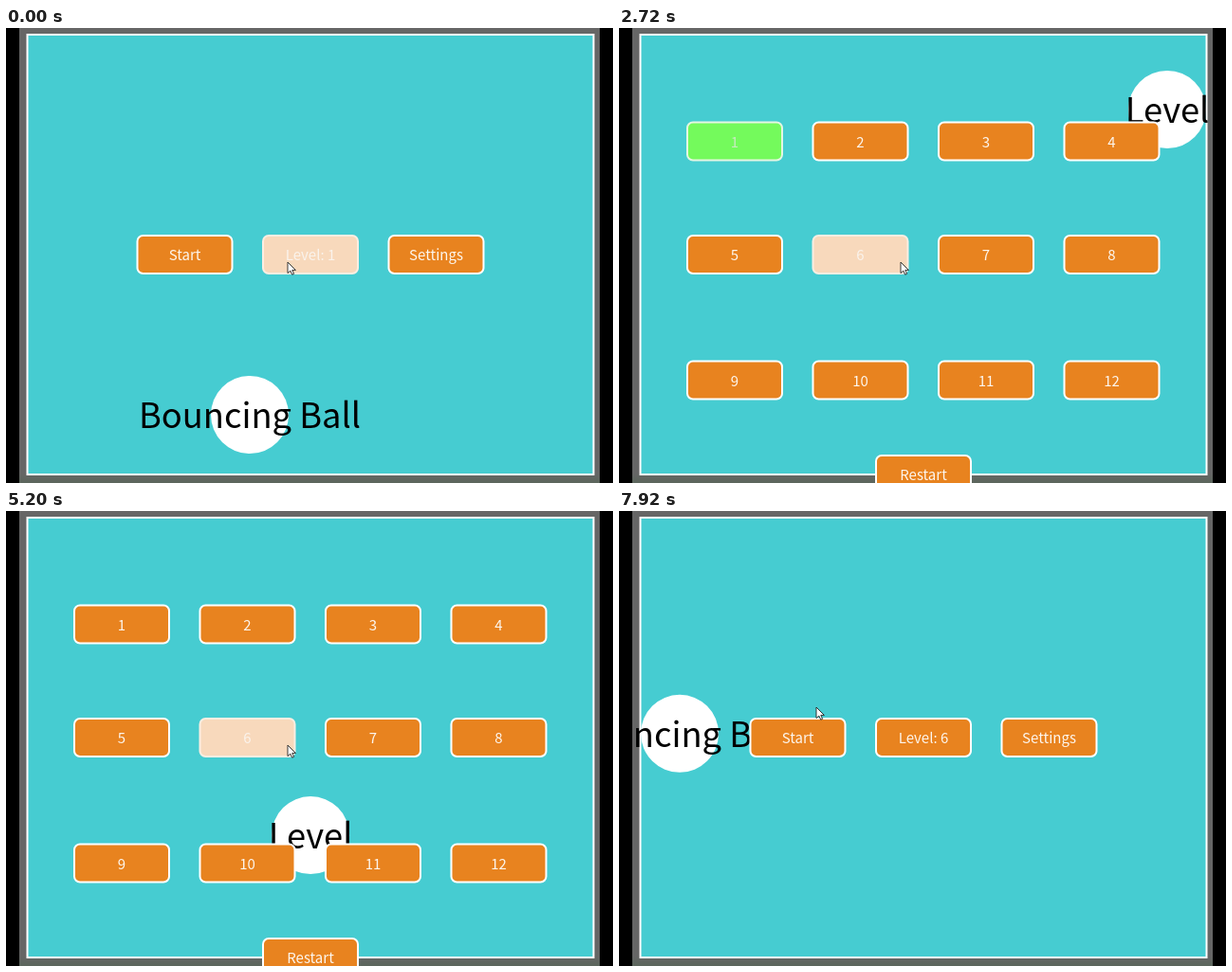
Animation of 640 by 480 pixels, one loop 8 s. Source, as an HTML page:

```html
<!DOCTYPE html>
<html lang="en">
<head>
<meta charset="utf-8">
<title>Bouncing Ball</title>
<style>
  html, body { margin: 0; width: 100%; height: 100%; overflow: hidden; background: #000; }
  svg { display: block; width: 640px; height: 480px; }
  text { font-family: "Noto Sans CJK JP", "Noto Sans CJK SC", "Noto Sans", sans-serif; text-anchor: middle; }
  .btn rect { fill: #e8831f; stroke: #fff; stroke-width: 2; }
  .btn text { fill: #fdf6ee; font-size: 15px; }
  .btn.on rect { fill: #74fa5c; stroke: #e4f6e2; }
  .btn.on text { fill: #c8eac0; }
  .btn.hover rect { fill: #f8d9bc; stroke: #fbeee2; }
  .btn.hover text { fill: #faf3ec; }
</style>
</head>
<body>
<svg viewBox="0 0 640 480">
  <defs>
    <clipPath id="win"><rect x="14" y="0" width="612" height="480"/></clipPath>
    <linearGradient id="base" x1="0" y1="0" x2="0" y2="1">
      <stop offset="0" stop-color="#666"/>
      <stop offset="1" stop-color="#5b665c"/>
    </linearGradient>
  </defs>
  <rect width="640" height="480"/>
  <rect x="14" width="612" height="480" fill="#666"/>
  <rect x="14" y="470" width="612" height="10" fill="url(#base)"/>
  <rect x="22.5" y="7" width="597" height="464" fill="#46ccd1" stroke="#fff" stroke-width="2"/>
  <g clip-path="url(#win)">
    <g id="ball">
      <circle r="41" fill="#fff"/>
      <text id="title" y="14" font-size="36.3"></text>
    </g>
    <g id="menu"></g>
    <g id="grid"></g>
  </g>
  <path id="cursor" d="M0 0V11.6L2.8 9.1L4.7 13.2L6.6 12.4L4.8 8.4H8.4Z"
        fill="#fff" stroke="#222" stroke-width="0.9"/>
</svg>
<script>
const LOOP = 8000, STEP = 80;
const OPEN_GRID = 1360, PICK_LEVEL = 3120, BACK = 7120;
const HOVER_LAG = 240;

// Travel as if the walls were mirrors: [time, x, y]
const travel = [
  [0, 257, 408], [2720, 578, 86], [3120, 625, 39], [4400, 1400.5, -720],
  [5920, 2279, -1590], [6720, 2770, -2073], [7336, 3148, -2449], [8000, 3148, -2854]
];
const mouse = [
  [0, 297, 247], [5240, 297, 247], [5560, 160, 243], [5700, 152, 250],
  [5920, 187, 366], [6400, 307, 455], [7140, 307, 455],
  [7560, 208, 207], [8000, 208, 207]
];

const $ = id => document.getElementById(id);

function at(keys, t) {
  t = Math.max(0, t);
  const i = Math.max(1, keys.findIndex(k => k[0] >= t));
  const [t0, x0, y0] = keys[i - 1], [t1, x1, y1] = keys[i];
  const p = (t - t0) / (t1 - t0);
  return [x0 + (x1 - x0) * p, y0 + (y1 - y0) * p];
}

function fold(v, lo, hi) {
  const span = hi - lo;
  const m = (((v - lo) % (2 * span)) + 2 * span) % (2 * span);
  return lo + (m > span ? 2 * span - m : m);
}

function el(tag, attrs, parent) {
  const node = document.createElementNS("http://www.w3.org/2000/svg", tag);
  for (const k in attrs) node.setAttribute(k, attrs[k]);
  return parent.appendChild(node);
}

function button(parent, label, x, y) {
  const g = el("g", { class: "btn", transform: `translate(${x} ${y})` }, parent);
  el("rect", { x: -50, y: -20, width: 100, height: 40, rx: 6 }, g);
  const text = el("text", { y: 6 }, g);
  text.textContent = label;
  return { g, text, x, y };
}

const menu = ["Start", "Level: 1", "Settings"]
  .map((s, i) => button($("menu"), s, 188.5 + 132.5 * i, 239));
const rows = [119.5, 239, 371.5];
const grid = Array.from({ length: 12 }, (_, i) =>
  button($("grid"), i + 1, 122 + 132.5 * (i % 4), rows[i >> 2]));
grid.push(button($("grid"), "Restart", 321, 471));

function draw(t) {
  const inGrid = t >= OPEN_GRID && t < BACK;
  const level = t < PICK_LEVEL ? 1 : 6;
  $("menu").style.display = inGrid ? "none" : "";
  $("grid").style.display = inGrid ? "" : "none";
  $("title").textContent = inGrid ? "Level" : "Bouncing Ball";
  menu[1].text.textContent = "Level: " + level;

  const [u, v] = at(travel, t);
  $("ball").setAttribute("transform", `translate(${fold(u, 64, 578)} ${fold(v, 49, 429)})`);
  $("cursor").setAttribute("transform", `translate(${at(mouse, t)})`);

  const [mx, my] = at(mouse, t - HOVER_LAG);
  (inGrid ? grid : menu).forEach((b, i) => {
    const over = Math.abs(mx - b.x) < 51 && Math.abs(my - b.y) < 21;
    b.g.classList.toggle("hover", over);
    b.g.classList.toggle("on", inGrid && i + 1 === level);
  });
}

const start = performance.now();
function tick() {
  const t = (performance.now() - start) % LOOP;
  draw(Math.floor(t / STEP) * STEP);
  requestAnimationFrame(tick);
}
draw(0);
requestAnimationFrame(tick);
</script>
</body>
</html>
```
